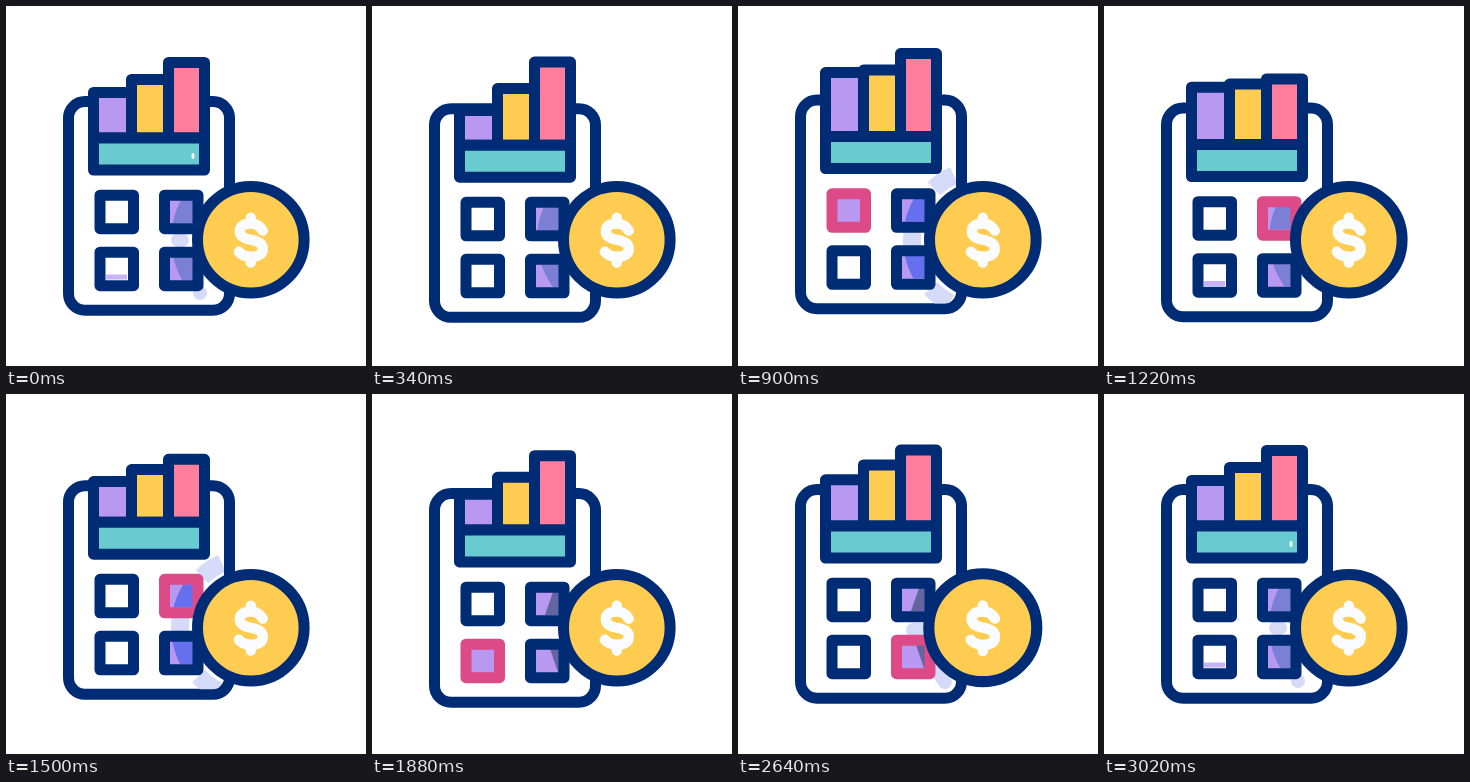
Animation, 360 px wide and 360 px high, one loop 3.28 s. Source, as an HTML page:

```html
<!DOCTYPE html>
<html lang="en">
<head>
<meta charset="utf-8">
<title>Calculator and coin</title>
<style>
  html, body { margin: 0; width: 100%; height: 100%; overflow: hidden; background: #fff; }
  svg { display: block; width: 100vw; height: 100vh; }
  .line { stroke: #002b75; stroke-width: 11; stroke-linejoin: round; }
  .glow { fill: none; stroke: #d5daf8; stroke-width: 14; stroke-linecap: round; }
  .dollar { fill: none; stroke: #fbfcff; stroke-width: 10.3; stroke-linecap: round; stroke-linejoin: round; }
</style>
</head>
<body>
<svg viewBox="0 0 360 360">
  <defs>
    <clipPath id="inside"><rect x="68" y="101" width="150" height="198" rx="11"/></clipPath>
    <clipPath id="right"><path d="M164 194h23v23h-23zM164 251h23v23h-23z"/></clipPath>
  </defs>
  <g id="body">
    <rect class="line" x="62.5" y="95.5" width="161" height="208.7" rx="16.5" fill="#fff"/>
    <g clip-path="url(#inside)" class="glow">
      <g class="still">
        <circle id="ring" cx="245" cy="234" r="71" stroke-width="18" stroke-linecap="butt"
          style="stroke-width:18;stroke-linecap:butt" stroke-dasharray="24 43" transform="rotate(118 245 234)"/>
      </g>
      <path id="rays" d="M175 236h14M200 278l7 10"/>
      <path id="rest" d="M172 234h4M194 287h0"/>
    </g>
    <g id="fills" fill="#b998f2"></g>
    <g clip-path="url(#right)">
      <g class="still"><circle id="shade" cx="245" cy="233" r="80"/></g>
      <path id="wedge" d="M181 194L173 217H188V194zM178 251L186 274H188V251z" fill="#62659f"/>
    </g>
    <path id="tint" d="M100 271h21" stroke="#c9b2f5" stroke-width="5"/>
    <g id="buttons"></g>
    <g id="bars"></g>
    <rect class="line" x="87.5" y="132" width="111" height="32" fill="#69cbd0"/>
    <ellipse id="spark" cx="187" cy="150" rx="1.5" ry="3" fill="#fff"/>
  </g>
  <g id="coin">
    <circle class="line" r="53.3" fill="#ffcc52"/>
    <path class="dollar" d="M12-9Q8-16 0-16Q-11-16-11-8.500Q-11-2 0 0Q12 2 12 9Q12 17 0 17Q-8 17-12 12M0-22v6M0 17v6"/>
  </g>
</svg>
<script>
const LOOP = 3280, STEP = 20, BEGIN = 120, END = 2820;
const NAVY = [0, 43, 117], PINK = [220, 74, 135];
const $ = id => document.getElementById(id);
const clamp = v => Math.max(0, Math.min(1, v));
const within = (t, a, b) => t >= a && t < b;

function rect(parent, attrs) {
  const el = document.createElementNS('http://www.w3.org/2000/svg', 'rect');
  for (const k in attrs) el.setAttribute(k, attrs[k]);
  return $(parent).appendChild(el);
}

// The body swings down and up between these turning points, from rest to rest.
const turns = [BEGIN, 300, 720, 1130, 1680, 1975, 2340];
const swing = i => i % (turns.length - 1) ? (i % 2 ? 7.5 : -7.5) : 0;
function bob(t) {
  const i = turns.findIndex(end => end > t);
  if (i < 1) return 0;
  const u = (t - turns[i - 1]) / (turns[i] - turns[i - 1]);
  return swing(i - 1) + (swing(i) - swing(i - 1)) * (1 - Math.cos(Math.PI * u)) / 2;
}

// The coin pops and rings out.
function pop(t) {
  const s = t - 1880;
  return within(s, 0, END - 1880) ? 1 + 0.19 * Math.exp(-s / 280) * Math.sin(Math.PI * s / 300) : 1;
}

// Each bar grows and shrinks as a sine wave, eased in and out at both ends.
function grow({ amp, decay, zero, half }, t) {
  const fade = clamp((t - BEGIN) / 480) * clamp((END - t) / 480);
  const level = 1 - decay * (t - BEGIN) / (END - BEGIN);
  return amp * level * fade * Math.sin(Math.PI * (t - zero) / half);
}

const bars = [
  { x: 87.5, w: 38, top: 86.5, fill: '#b998f2', amp: 29, decay: 1, zero: 620, half: 790 },
  { x: 125.5, w: 37, top: 73.5, fill: '#ffcc52', amp: 8, decay: 0, zero: 480, half: 805 },
  { x: 162.5, w: 36, top: 56.5, fill: '#ff7e9d', amp: 26, decay: 1, zero: 120, half: 900 }
];
for (const b of bars) b.el = rect('bars', { class: 'line', x: b.x, width: b.w, fill: b.fill });

// Keys are pressed one after another.
const keys = [0, 1, 2, 3].map(i => {
  const box = { x: 94 + 64.5 * (i % 2), y: 189.2 + 57 * (i >> 1), width: 33.5, height: 33.5 };
  return {
    on: 640 + 540 * i,
    lilac: i % 2,
    fill: rect('fills', box),
    edge: rect('buttons', { ...box, class: 'line', fill: 'none' })
  };
});

const show = (id, on) => $(id).style.visibility = on ? 'visible' : 'hidden';

function draw(t) {
  const dy = bob(t);
  $('body').setAttribute('transform', `translate(0 ${dy})`);
  for (const el of document.querySelectorAll('.still')) {
    el.setAttribute('transform', `translate(0 ${-dy})`);
  }
  $('coin').setAttribute('transform', `translate(244.800 233.700) scale(${pop(t)})`);
  for (const b of bars) {
    const y = b.top - grow(b, t);
    b.el.setAttribute('y', y);
    b.el.setAttribute('height', 132 - y);
  }
  for (const key of keys) {
    const k = clamp(Math.min(t - key.on, key.on + 500 - t) / 40);
    key.edge.style.stroke = `rgb(${NAVY.map((c, i) => c + (PINK[i] - c) * k)})`;
    key.fill.style.opacity = key.lilac || k;
  }
  const ring = within(t, 400, 1000) || within(t, 1380, 1740);
  const wedge = within(t, 1740, 2760);
  const rest = t < 240 || t >= 2760;
  show('ring', ring);
  show('rays', within(t, 2240, 2760));
  show('rest', rest);
  show('wedge', wedge);
  show('shade', !wedge);
  $('shade').setAttribute('fill', ring ? '#6470ee' : '#7b7fd6');
  show('tint', rest || within(t, 1000, 1380));
  show('spark', rest || within(t, 2260, 2480));
}

const start = performance.now();
function tick() {
  const t = (performance.now() - start) % LOOP;
  draw(Math.floor(t / STEP) * STEP);
  requestAnimationFrame(tick);
}
tick();
</script>
</body>
</html>
```
